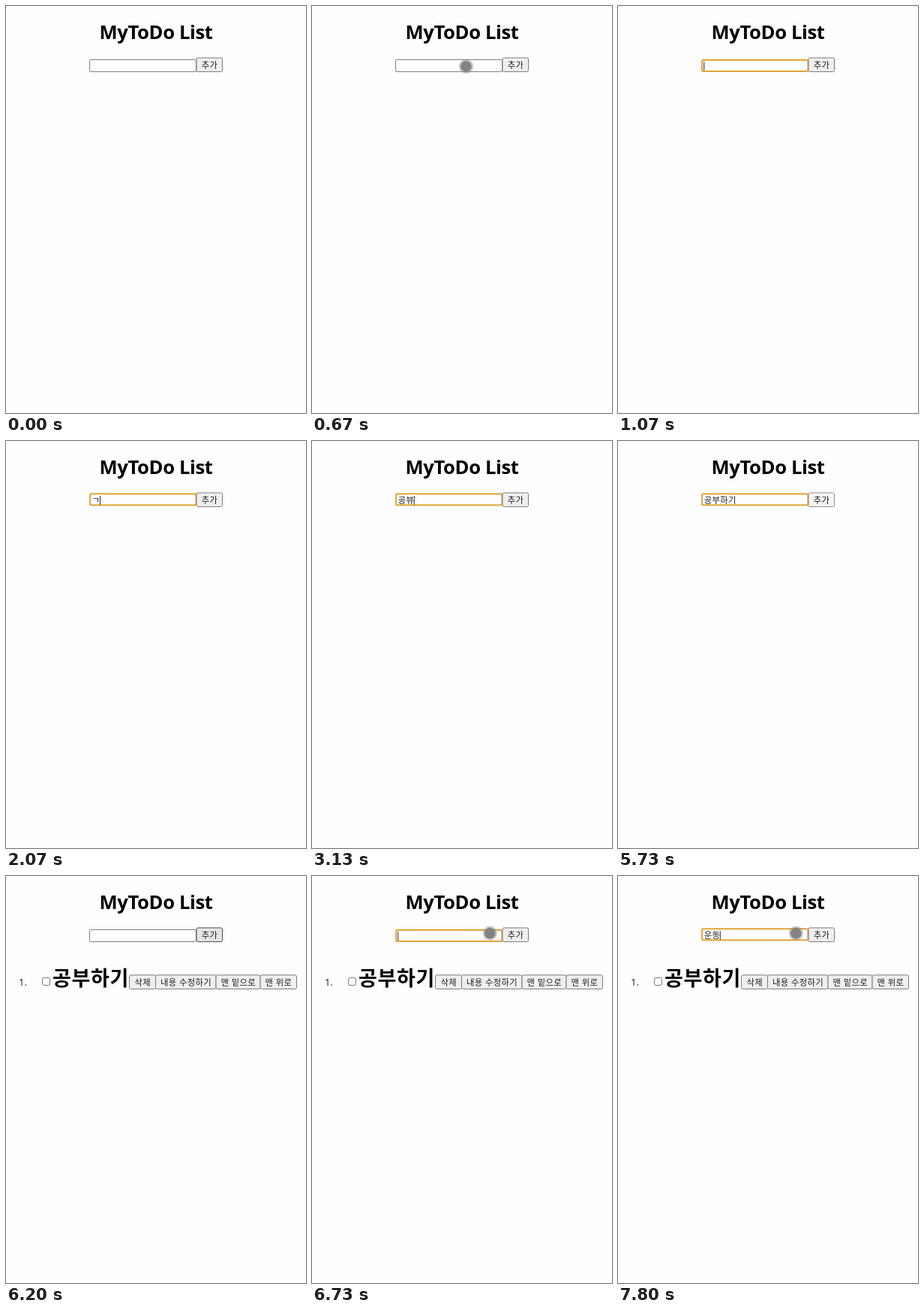
Recreate the animation shown at these times as an HTML page. Size 400x542 px, loop 8 s.

```html
<!DOCTYPE html>
<html lang="ko">
<head>
<meta charset="utf-8">
<title>MyToDo List</title>
<style>
  html, body { margin: 0; width: 100%; height: 100%; overflow: hidden; background: #fefdff; }
  svg { display: block; }
  text { font-family: "Noto Sans CJK KR", "Noto Sans CJK", "Noto Sans CJK JP", sans-serif; font-size: 11.3px; letter-spacing: .37px; fill: #1c1c1c; white-space: pre; }
  .title { font-family: "Open Sans", "Noto Sans", sans-serif; font-size: 25.6px; font-weight: 700; letter-spacing: -.36px; text-anchor: middle; fill: #000; }
  .num { font-family: "Open Sans", "Noto Sans", sans-serif; font-size: 13px; letter-spacing: 0; }
  .task { font-size: 27px; font-weight: 700; letter-spacing: .66px; fill: #000; }
  .btn text { text-anchor: middle; }
  .btn rect { fill: #efefef; stroke: #7c7c7c; }
  .btn.hover rect { fill: #e5e5e5; stroke: #4f4f4f; }
  .btn.down rect { fill: #f5f5f5; stroke: #8d8d8d; }
</style>
</head>
<body>
<svg id="stage" width="400" height="542" viewBox="0 0 400 542">
  <rect width="400" height="542" fill="#fefdff"/>
  <text class="title" x="200" y="44.1">MyToDo List</text>
  <rect id="box" fill="#fefdff"/>
  <text id="typed" x="114.7" y="83.1"></text>
  <rect id="caret" width="1" height="11.5" fill="#222"/>
  <g id="item">
    <text class="num" x="17" y="146">1.</text>
    <rect x="48.5" y="135.5" width="10" height="10" rx="2" fill="#fff" stroke="#767676"/>
    <text class="task" x="62" y="146.3">공부하기</text>
  </g>
  <g id="pointer">
    <circle r="9.5" fill="#8c8c8c" fill-opacity=".5"/>
    <circle r="7.2" fill="#828282"/>
  </g>
</svg>
<script>
const LOOP = 8000;
const $ = id => document.getElementById(id);
const box = $('box'), typed = $('typed'), caret = $('caret'), item = $('item'), pointer = $('pointer');

function el(tag, attrs, parent) {
  const node = document.createElementNS('http://www.w3.org/2000/svg', tag);
  set(node, attrs);
  parent.appendChild(node);
  return node;
}
function set(node, attrs) {
  for (const k in attrs) node.setAttribute(k, attrs[k]);
}
function show(node, on) {
  node.setAttribute('visibility', on ? 'visible' : 'hidden');
}
function button(label, left, right, top, parent) {
  const g = el('g', { class: 'btn' }, parent);
  el('rect', { x: left, y: top, width: right - left, height: 18.5, rx: 2 }, g);
  el('text', { x: (left + right) / 2 + .2, y: top + 14.3 }, g).textContent = label;
  return g;
}

const add = button('추가', 254, 288.5, 69, $('stage'));
$('stage').appendChild(pointer);
button('삭제', 164.5, 199.5, 131.9, item);
button('내용 수정하기', 199.5, 280, 131.9, item);
button('맨 밑으로', 280, 339, 131.9, item);
button('맨 위로', 339, 387.5, 131.9, item);

// [time, field content]
const typing = [
  [0, ''], [2000, 'ㄱ'], [2130, '고'], [2270, '공'], [2330, '공ㅂ'],
  [2600, '공뷰'], [2670, '공뷰하'], [3130, '공뷰'], [3270, '공'],
  [3600, '공ㅂ'], [3730, '공부'], [3870, '공붛'], [3930, '공부하'],
  [4070, '공부하ㄱ'], [4130, '공부하기'], [5870, ''],
  [7330, 'ㅇ'], [7400, '우'], [7470, '운'], [7600, '운ㄷ'], [7670, '운도'], [7800, '운동']
];

// [start, end, x0, y0, x1, y1]
const moves = [
  [270, 330, 221.5, 55.5, 221.5, 55.5],
  [470, 670, 205.5, 80.5, 205.5, 80.5],
  [670, 1070, 205.5, 80.5, 190, 74],
  [5000, 5200, 232, 46, 268, 84],
  [5400, 5600, 270, 80, 270, 80],
  [6400, 6600, 264, 79, 240, 78],
  [6600, 6730, 240, 78, 237.3, 76.3],
  [6730, 8001, 237.3, 76.3, 237.3, 76.3]
];

const within = (t, a, b) => t >= a && t < b;

function draw(t) {
  const [since, text] = typing.filter(s => s[0] <= t).pop();
  const focused = within(t, 1000, 5870) || t >= 6730;
  const blinkFrom = Math.max(since, t >= 6730 ? 6730 : 1000);
  const lift = text ? 1.5 : 0;

  set(box, focused
    ? { x: 112, y: 71.9 - lift, width: 141.3, height: 15, rx: 2, stroke: '#dc9a1c', 'stroke-width': 1.7 }
    : { x: 111.5, y: 71.5, width: 142, height: 16, rx: 1.5, stroke: '#808080', 'stroke-width': 1 });
  typed.textContent = text;
  set(caret, { x: 114.2 + text.length * 10.77, y: 74.2 - lift / 1.5 });
  show(caret, focused && Math.floor((t - blinkFrom) / 530) % 2 === 0);

  const state = within(t, 5600, 5870) ? ' down'
    : within(t, 5200, 5600) || within(t, 5870, 6500) ? ' hover' : '';
  add.setAttribute('class', 'btn' + state);
  show(item, t >= 5870);

  const m = moves.find(s => within(t, s[0], s[1]));
  show(pointer, !!m);
  if (m) {
    const k = (t - m[0]) / (m[1] - m[0]);
    set(pointer, { transform: `translate(${m[2] + (m[4] - m[2]) * k} ${m[3] + (m[5] - m[3]) * k})` });
  }
}

const start = performance.now();
function tick(now) {
  draw(Math.max(0, now - start) % LOOP);
  requestAnimationFrame(tick);
}
draw(0);
requestAnimationFrame(tick);
</script>
</body>
</html>
```
